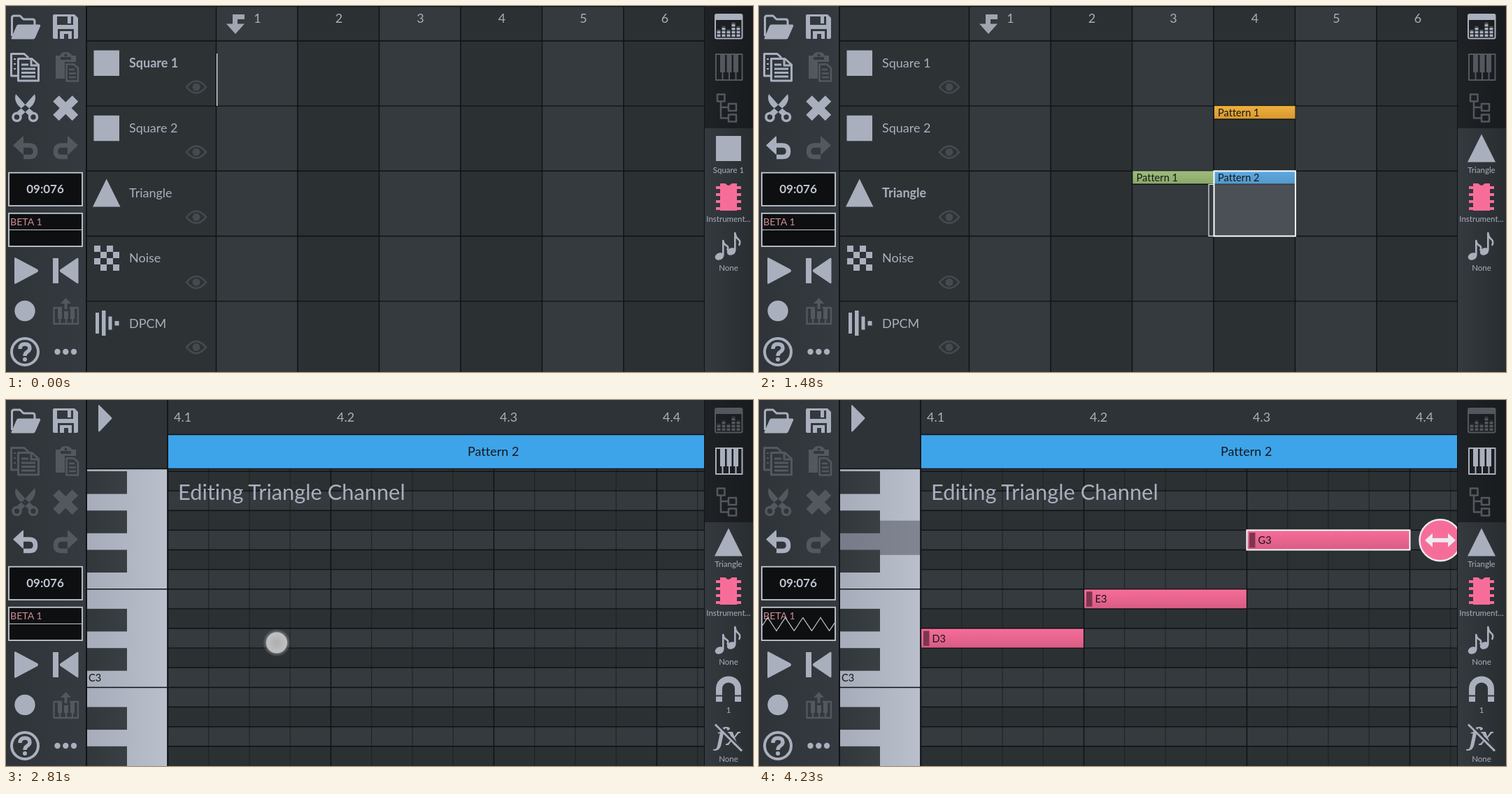
These frames come from a looping animation (1068 px wide and 524 px high, 4.3 s). An HTML page:

```html
<!DOCTYPE html>
<html lang="en">
<head>
<meta charset="utf-8">
<title>Chiptune editor</title>
<style>
html, body { margin: 0; width: 100%; height: 100%; overflow: hidden; background: #31373b; }
svg { display: block; width: 100%; height: 100%; font-family: Lato, "Open Sans", sans-serif; font-variant-ligatures: none; }
.icon { color: #a9afbd; }
.dim { color: #53585f; }
.fill { fill: currentColor; }
.line { fill: none; stroke: currentColor; stroke-width: 3; stroke-linejoin: round; }
.label { font-size: 18px; fill: #a9afbd; }
.bold { font-weight: 700; }
.small { font-size: 11.5px; fill: #a9afbd; text-anchor: middle; }
.tag { font-size: 14.6px; fill: #15181a; }
.off { display: none; }
</style>
</head>
<body>
<svg viewBox="0 0 1068 524" preserveAspectRatio="none">
  <defs>
    <linearGradient id="left"><stop stop-color="#2e3438"/><stop offset="1" stop-color="#343a3f"/></linearGradient>
    <linearGradient id="right"><stop stop-color="#343a3f"/><stop offset="1" stop-color="#282d30"/></linearGradient>
    <linearGradient id="ivory"><stop stop-color="#a6acb9"/><stop offset="1" stop-color="#babfcc"/></linearGradient>
    <linearGradient id="ebony"><stop stop-color="#32373b"/><stop offset="1" stop-color="#3a3f44"/></linearGradient>
    <linearGradient id="orange" x2="0" y2="1"><stop stop-color="#f0b03c"/><stop offset="1" stop-color="#d6982f"/></linearGradient>
    <linearGradient id="green" x2="0" y2="1"><stop stop-color="#9ebc7b"/><stop offset="1" stop-color="#8aa769"/></linearGradient>
    <linearGradient id="blue" x2="0" y2="1"><stop stop-color="#40a7ee"/><stop offset="1" stop-color="#3890cb"/></linearGradient>
    <linearGradient id="pink" x2="0" y2="1"><stop stop-color="#f76d99"/><stop offset="1" stop-color="#d75c84"/></linearGradient>
    <radialGradient id="glow">
      <stop stop-color="#b4b4b4" stop-opacity=".95"/><stop offset=".64" stop-color="#c6c6c6" stop-opacity=".95"/>
      <stop offset=".72" stop-color="#d0d0d2" stop-opacity=".9"/><stop offset=".8" stop-color="#8a8d95" stop-opacity=".5"/>
      <stop offset="1" stop-color="#8a8d95" stop-opacity="0"/>
    </radialGradient>
    <clipPath id="main"><rect x="116" width="882" height="524"/></clipPath>
    <g id="undo">
      <path class="fill" d="M10 199.500L24 186.500Q25 186 25 187.500V211.500Q25 213 24 212.500Z"/>
      <path class="line" style="stroke-width:6.500" d="M22 199.500H33Q42 199.500 42 208Q42 216 34 216H25"/>
    </g>
    <g id="eye"><path d="M258 116Q272 99 286 116Q272 133 258 116Z" fill="none" stroke="#454a4f" stroke-width="2.600"/><circle cx="272" cy="116" r="5.500" fill="#454a4f"/></g>
  </defs>

  <rect width="1068" height="524" fill="#111417"/>

  <g clip-path="url(#main)">
    <g id="song" data-t="0-2080"></g>
    <rect data-t="2010-2080" x="116" width="882" height="524" fill="#33393d" opacity=".8"/>
    <g id="roll" data-t="2080-4300"></g>
  </g>

  <!-- toolbar -->
  <rect width="114" height="524" fill="url(#left)"/>
  <g class="icon">
    <path class="line" d="M8.500 43V17Q8.500 14 11.500 14H20L25 19H38Q41 19 41 22V27"/>
    <path class="fill" d="M18 26.500H47Q50 26.500 49 29L42 45Q41 47.500 38.500 47.500H9Q6.500 47.500 8 45L15 28.500Q16 26.500 18 26.500Z"/>
    <path class="fill" fill-rule="evenodd" d="M67 14Q67 12 69 12H98L103 17V45Q103 47 101 47H69Q67 47 67 45ZM73 15V27H96V15ZM74 33V47H97V33Z"/>
    <path class="fill" d="M88 15H93V25H88ZM77 36H94V47H89V40H83V47H77Z"/>
    <g data-dim="2080-4300">
      <path class="line" d="M16 100H7.500V68.500H26L32 74"/>
      <path class="line" d="M17.500 75.500H37L46.500 84V107H17.500ZM36 76V85H46M22 84H32M22 90H42M22 95.500H42M22 101H42"/>
      <path class="line" d="M11 76H14M11 83H14M11 90H14" style="stroke-width:2"/>
    </g>
    <g class="dim">
      <path class="fill" fill-rule="evenodd" d="M71 71H77Q79 66 85.500 66T94 71H100V80H84V104H71ZM78 73V77H93V73ZM83.500 70.500a2 2 0 1 0 4 0a2 2 0 1 0-4 0Z"/>
      <path class="line" style="stroke-width:2.600" d="M86.500 83.500H97L103 89V107.500H86.500ZM90 91H98M90 96.500H100M90 102H100"/>
    </g>
    <g data-dim="2080-4300">
      <path class="fill" d="M14 126Q11 134 17 142L34 158L41 153L29 143ZM41 126Q44 134 38 142L21 158L14 153L26 143Z"/>
      <circle class="line" cx="15.500" cy="159" r="5.500" style="stroke-width:3.600"/><circle class="line" cx="39" cy="159" r="5.500" style="stroke-width:3.600"/>
    </g>
    <path data-dim="2080-4300" class="line" style="stroke-width:12" d="M71.500 132.500L99 160M99 132.500L71.500 160"/>
    <use href="#undo" data-dim="0-600"/>
    <use href="#undo" class="dim" transform="matrix(-1 0 0 1 113 0)"/>
    <path class="fill" d="M12 361.500Q12 359.500 14 360.500L45 377Q47 379 45 381L14 397.500Q12 398.500 12 396.500ZM67 361H75V397H67ZM103.500 362V396Q103.500 398 101.500 397L78 381Q75.500 379 78 377L101.500 361Q103.500 360 103.500 362Z"/>
    <circle class="fill" cx="27" cy="436.500" r="14.700"/>
    <g class="dim">
      <path class="line" style="stroke-width:2.400" d="M80 432H68.500V455H103V432H91M77 447V455M86 447V455M95 447V455"/>
      <path class="fill" d="M74 433H80V448H74ZM83 437H89V448H83ZM92 433H98V448H92ZM85.500 418L93 426H87.500V434H83.500V426H78Z"/>
    </g>
    <circle class="line" cx="27" cy="495" r="19" style="stroke-width:4"/>
    <path class="line" style="stroke-width:5.400" d="M20 491Q20 484 27 484T34 490Q34 493 30 495.500Q27 497.500 27 501"/>
    <circle class="fill" cx="27" cy="506" r="3"/>
    <circle class="fill" cx="73.500" cy="495" r="4.200"/><circle class="fill" cx="85.300" cy="495" r="4.200"/><circle class="fill" cx="97" cy="495" r="4.200"/>
  </g>
  <g fill="#0d0f10" stroke="#c5cad4" stroke-width="1.800">
    <rect x="4" y="238.700" width="105" height="47.300"/>
    <rect x="4" y="296.800" width="105" height="47.300"/>
  </g>
  <text class="bold" x="56" y="268" font-size="17" text-anchor="middle" fill="#c0c5d1">09:076</text>
  <text x="6" y="313.500" font-size="14.200" fill="#d38a97">BETA 1</text>
  <g id="scope" fill="none" stroke="#c5cad4" stroke-width="1.200"></g>

  <!-- quick access -->
  <rect x="999" width="69" height="524" fill="url(#right)"/>
  <rect x="999" width="69" height="175" fill="#0a0b0c" opacity=".5"/>
  <g class="icon">
    <g data-dim="2080-4300">
      <rect class="line" x="1014" y="12" width="38.500" height="34.500" rx="2" style="stroke-width:2"/>
      <path class="fill" d="M1014 12H1052V20H1014Z"/>
      <path class="line" style="stroke-width:5;stroke-dasharray:3.500 1.300" d="M1019 44V34M1026 44V29M1033 44V34M1040 44V24M1047 44V29"/>
    </g>
    <g data-dim="0-2080">
      <path class="line" style="stroke-width:2" d="M1015 69H1052.500V106H1015ZM1024.500 94V106M1034 94V106M1043.500 94V106"/>
      <path class="fill" d="M1021 69H1028V95H1021ZM1030.500 69H1037.500V95H1030.500ZM1040 69H1047V95H1040Z"/>
    </g>
    <path class="line dim" style="stroke-width:2.500" d="M1017 126.500H1027.500V136.500H1017ZM1033 140H1044V150H1033ZM1033 155.500H1044V165.500H1033ZM1022 137V160.500H1033M1022 145H1033"/>
    <rect data-t="0-810" class="fill" x="1015" y="186" width="36" height="36"/>
    <path data-t="810-4300" class="fill" d="M1033 183.500L1053 223.500H1013Z"/>
    <path d="M1021 254H1028.500Q1033 260 1037.500 254H1045V293H1021ZM1015 258H1051V262H1015ZM1015 268H1051V272H1015ZM1015 278H1051V282H1015ZM1015 288H1051V292H1015Z" fill="#f76d99"/>
    <g class="fill">
      <ellipse cx="1020" cy="358.500" rx="6.500" ry="5" transform="rotate(-25 1020 358.500)"/>
      <ellipse cx="1037" cy="351.500" rx="6.500" ry="5" transform="rotate(-25 1037 351.500)"/>
    </g>
    <path class="line" style="stroke-width:2.600" d="M1025.300 357V336Q1026 341 1030 343T1031 350M1042.300 350V325Q1043 331 1047 334T1048 343"/>
    <g data-t="2080-4300">
      <path class="line" style="stroke-width:9" d="M1019.500 432V413a13.500 13 0 0 1 27 0V432"/>
      <path d="M1014 423.500H1025M1041 423.500H1052" stroke="#30363a" stroke-width="2"/>
      <text class="fill" x="1033" y="494" text-anchor="middle" font-family="'Noto Serif', 'Liberation Serif', serif" font-style="italic" font-weight="700" font-size="34">fx</text>
      <path d="M1016 463L1055 502" stroke="#30363a" stroke-width="3"/>
      <path class="line" d="M1014 464.500L1052 502.500"/>
    </g>
  </g>
  <g class="small">
    <text data-t="0-600" x="1033" y="238.500">Square 1</text>
    <text data-t="600-810" x="1033" y="238.500">Square 2</text>
    <text data-t="810-4300" x="1033" y="238.500">Triangle</text>
    <text x="1033" y="308.500">Instrument...</text>
    <text x="1033" y="378.500">None</text>
    <g data-t="2080-4300"><text x="1033" y="448">1</text><text x="1033" y="518">None</text></g>
  </g>
  <g id="touch"></g>
</svg>

<script>
const LOOP = 4300;
const $ = id => document.getElementById(id);
const rect = (x, y, w, h, fill, more = '') =>
  `<rect x="${x}" y="${y}" width="${w}" height="${h}" fill="${fill}" ${more}/>`;
const path = (d, more = '') => `<path d="${d}" ${more}/>`;
const text = (x, y, s, cls = 'label', more = '') => `<text x="${x}" y="${y}" class="${cls}" ${more}>${s}</text>`;
const DARK = '#2b3033', LIGHT = '#343a3e', INK = '#0f1214';

// Arrangement view
const COL = 116.5, ROW = 93.15;
const colX = c => 301 + c * COL;
const rowY = r => 50 + r * ROW;

function track(name, r, bold) {
  return text(176, 88 + r * ROW, name, 'label', bold ? `data-bold="${bold}"` : '') +
    `<use href="#eye" y="${r * ROW}"/>`;
}

function pattern(name, c, r, color, born, left) {
  const x = colX(c), y = rowY(r);
  const select = rect(x, y, COL, ROW, '#aaafc3', 'opacity=".25"') +
    path(`M${x} ${y + 19}H${x - 7.5}V${y + ROW}H${x}`, 'fill="none" stroke="#e4e4e6" stroke-width="1.2"') +
    rect(x, y, COL, ROW, 'none', 'stroke="#fff" stroke-width="2"');
  return `<g data-t="${born}-2080">` + rect(x + .5, y, COL - 1, 18.5, `url(#${color})`) +
    path(`M${x} ${y + 19}h${COL}`, `stroke="${INK}" stroke-width="1.4"`) +
    `<g data-t="${born}-${left}">${select}</g>` + text(x + 5.5, y + 14.5, name, 'tag') + '</g>';
}

function buildSong() {
  let s = rect(116, 0, 185, 524, '#2d3235'), lines = 'M116 .5H998';
  for (let c = 0; c < 6; c++) {
    s += rect(colX(c), 0, COL, 524, c % 2 ? DARK : LIGHT) +
      text(colX(c) + 58.5, 23.5, c + 1, 'label', 'text-anchor="middle"');
    lines += `M${colX(c) - .5} 0V524`;
  }
  for (let r = 0; r < 5; r++) lines += `M116 ${rowY(r)}H998`;
  s += path(lines, `stroke="${INK}" stroke-width="1.4"`);
  s += path('M341 12V19H331V25.500H341L328 40L315 25.500H324V12Z', 'fill="#a0a5b0"');
  s += track('Square 1', 0, '0-600') + track('Square 2', 1, '600-810') +
    track('Triangle', 2, '810-2080') + track('Noise', 3) + track('DPCM', 4);

  let icons = 'M125.500 63.500h36.500v36.500h-36.500ZM125.500 156.700h36.500v36.500h-36.500ZM143.700 247.500L163.500 287.500H124Z';
  for (let i = 0; i < 16; i++) {
    const c = i % 4, r = i >> 2;
    if ((c + r) % 2 === 0) icons += `M${126 + c * 9} ${343 + r * 9}h9v9h-9Z`;
  }
  icons += 'M128 439h5v30h-5ZM137 436h5.500v36h-5.500ZM146.500 444.500h5v19h-5ZM155.500 451h6v6.500h-6Z';
  s += path(icons, 'fill="#a9afbd"');
  s += rect(301, 68, 1.3, 75, '#e8e8ea', 'data-t="0-600"');
  s += pattern('Pattern 1', 3, 1, 'orange', 600, 810) +
    pattern('Pattern 1', 2, 2, 'green', 810, 1350) +
    pattern('Pattern 2', 3, 2, 'blue', 1350, 2080);
  $('song').innerHTML = s;
}

// Piano roll: rows count downwards from the one at y = 102
const KEY = 28.13, BEAT = 233;
const keyY = r => 102 + r * KEY;
const beatX = b => 231.5 + b * BEAT;
const SHARPS = [0, 2, 4, 7, 9, 12, 14];

function pressed(y, h, from, to) {
  return rect(116, y, 114, h, '#4a4d58', `opacity=".5" data-t="${from}-${to}"`);
}

function note(name, beat, row, born, left) {
  const x = beatX(beat), y = keyY(row), cx = x + BEAT + 43.5, cy = y + KEY / 2 + .3;
  const a = 'm-22 0l11 -10v7h22v-7l11 10l-11 10v-7h-22v7z';
  return `<g data-t="${born}-4300">` +
    rect(x, y, BEAT, KEY, 'url(#pink)', `stroke="${INK}" stroke-width="1.2"`) +
    rect(x + 3.5, y + 3.5, 8.5, 21.5, '#7d3650') + text(x + 16, y + 19.5, name, 'tag') +
    `<g data-t="${born}-${left}">` + rect(x, y, BEAT, KEY, 'none', 'stroke="#fff" stroke-width="2"') +
    `<circle cx="${cx}" cy="${cy}" r="29.500" fill="#f76d99" stroke="#e9e9ec" stroke-width="2.400"/>` +
    path(`M${cx} ${cy}${a}`, 'fill="#ececee"') + '</g></g>';
}

function buildRoll() {
  let s = rect(116, 98, 115, 426, 'url(#ivory)');
  s += pressed(318, 46.8, 2940, 3290) + pressed(271, 47.5, 3490, 3890) + pressed(172.7, 49.2, 4020, 4300);
  s += rect(232, 98, 766, 426, LIGHT);
  let rows = '', subs = '', beats = '';
  for (let r = 0; r < 15; r++) {
    if (SHARPS.includes(r)) {
      s += rect(232, keyY(r), 766, KEY, DARK) + rect(115, keyY(r), 58, 32.5, 'url(#ebony)');
    }
    rows += `M232 ${keyY(r)}H998`;
  }
  for (let i = 0; i < 14; i++) {
    const x = beatX(i / 4);
    if (i % 4) subs += `M${x} 98V524`; else beats += `M${x} 98V524`;
  }
  s += path(subs, 'stroke="#1d2123"') +
    path(rows + beats + `M116 ${keyY(6)}H231M116 ${keyY(11)}H231`, `stroke="${INK}" stroke-width="1.4"`);
  s += text(118, 402.5, 'C3', 'tag');
  s += text(246, 143, 'Editing Triangle Channel', 'label', 'style="font-size:30.8px"');
  s += note('D3', 0, 8, 2940, 3490) + note('E3', 1, 6, 3490, 4020) + note('G3', 2, 3, 4020, 4300);
  s += rect(116, 0, 882, 98, '#2e3337') + rect(232, 50, 766, 48, '#3da4ea') +
    path('M231 0V524M232 49.500H998M116 98.500H998', `stroke="${INK}" stroke-width="1.6"`);
  s += path('M132 8Q132 6 134 8L151 25Q152 26 151 27L134 45Q132 46 132 44Z', 'fill="#a9afbd"');
  for (let b = 0; b < 4; b++) s += text(beatX(b) + 8.5, 31, '4.' + (b + 1));
  s += text(660, 80, 'Pattern 2', 'label', 'style="fill:#15181a"');
  $('roll').innerHTML = s;
}

// Triangle wave, locked to a rising edge in the middle
function wave(period, from, to) {
  let d = '';
  for (let x = 5; x <= 108; x += .5) {
    const p = (((x - 56.5) / period + .25) % 1 + 1) % 1;
    d += (d ? 'L' : 'M') + x + ' ' + (311.5 + 19 * Math.abs(2 * p - 1)).toFixed(1);
  }
  return path(d, `data-t="${from}-${to}"`);
}

function buildScope() {
  const idle = '0-2940 3290-3490 3890-4020';
  $('scope').innerHTML = path('M4 320.500H109', `data-t="${idle}"`) +
    wave(33.7, 2940, 3290) + wave(30, 3490, 3890) + wave(25.2, 4020, 4300);
}

// x, y, from, to, and when the finger lifts and the dot starts to fade
const touches = [
  [708, 204, 400, 600], [582, 302, 670, 810], [723, 304, 1140, 1350], [1043, 83, 1880, 2080, 2010],
  [387, 347.5, 2810, 2940], [590, 287, 3360, 3490], [815, 203, 3890, 4020]
];

const dot = (x, y, a, b, opacity = 1) =>
  `<circle cx="${x}" cy="${y}" r="20" fill="url(#glow)" opacity="${opacity}" data-t="${a}-${b}"/>`;

buildSong();
buildRoll();
buildScope();
$('touch').innerHTML = touches.map(([x, y, a, b, lift = b]) =>
  dot(x, y, a, lift) + dot(x, y, lift, b, .48)).join('');

// Each timed element switches a class inside or outside its time spans
const timed = [['t', 'off', false], ['dim', 'dim', true], ['bold', 'bold', true]].flatMap(([key, cls, on]) =>
  [...document.querySelectorAll(`[data-${key}]`)].map(el => ({
    el, cls, on, spans: el.dataset[key].split(' ').map(p => p.split('-').map(Number))
  })));

function draw(t) {
  for (const { el, cls, on, spans } of timed) {
    const inside = spans.some(([a, b]) => t >= a && t < b);
    el.classList.toggle(cls, inside === on);
  }
}

const start = performance.now();
function tick() {
  draw((performance.now() - start) % LOOP);
  requestAnimationFrame(tick);
}
tick();
</script>
</body>
</html>
```
